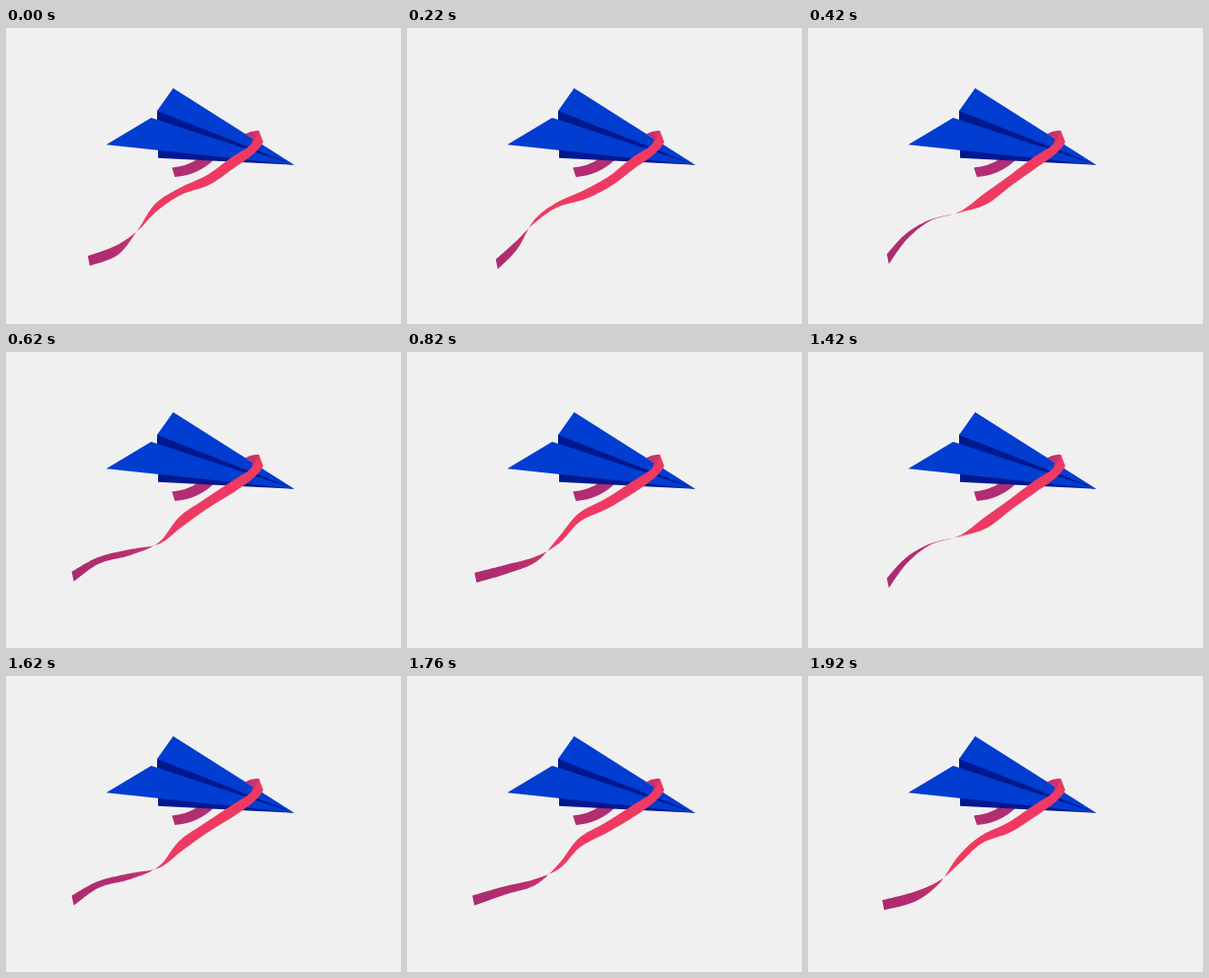
An HTML page that plays this animation: 400 px wide and 300 px high, repeating every 1.96 s.

```html
<!DOCTYPE html>
<html lang="en">
<head>
<meta charset="utf-8">
<title>Paper plane</title>
<style>
  html, body { margin: 0; width: 100%; height: 100%; overflow: hidden; background: #f0f0f0; }
  svg { display: block; width: 100%; height: 100%; }
</style>
</head>
<body>
<svg viewBox="0 0 400 300">
  <defs>
    <linearGradient id="fade">
      <stop offset="0" stop-color="#ac2b70"/>
      <stop offset=".55" stop-color="#b42d70"/>
      <stop offset="1" stop-color="#d0346a"/>
    </linearGradient>
    <linearGradient id="bend">
      <stop offset="0" stop-color="#b62e70"/>
      <stop offset="1" stop-color="#dc3866"/>
    </linearGradient>
  </defs>
  <!-- ribbon behind the plane -->
  <path fill="#b22d72" d="M168,141.5 Q182,140.5 194,133 L211,133 Q195,149 171,151Z"/>
  <!-- plane -->
  <path fill="#00188f" d="M153,84 L165,80 L292,138.7 L154,131.7 L154,122 L153,93Z"/>
  <path fill="#003dd0" d="M153,84 L169.3,61 L292,138.7Z"/>
  <path fill="#003dd0" d="M101.5,118.3 L147,91 L155,93.5 L292,138.7 L155,124Z"/>
  <!-- ribbon in front -->
  <path fill="url(#bend)" d="M242,107.5 Q249,103.5 256,104 L259,113 L248,118 Q251,112 249,111.5Z"/>
  <path id="tail" fill="url(#fade)"/>
  <path id="front" fill="#ee3a62"/>
</svg>
<script>
const LOOP = 1960, CYCLE = 20, DETAIL = 16;

// Fixed start of the loose ribbon: centre x, centre y, height
const ROOT = [[245, 126.5, 10], [229, 137, 11]];

// Points evenly spaced along the ribbon, each swinging about a rest place.
// Swings are [size, step of the peak]; a negative height shows the back side.
const POINTS = [
  { x: 204,   y: 154.3, h: 10,   dx: [1.7, 3.6],  dy: 1,   dh: [0, 0] },
  { x: 177.3, y: 169.6, h: 9,    dx: [2.8, 6],    dy: 4,   dh: [2, 9.5] },
  { x: 153.2, y: 186.5, h: 4,    dx: [1.8, 12],   dy: 7.5, dh: [3.5, 19.5] },
  { x: 128.5, y: 201.8, h: -1.7, dx: [4.7, 19.3], dy: 8,   dh: [4.5, 3.5] },
  { x: 103.7, y: 217.5, h: -7.5, dx: [10, 1.7],   dy: 7.7, dh: [2, 9] },
  { x: 78.5,  y: 233.2, h: -10,  dx: [12.5, 3.6], dy: 6.3, dh: [0, 0] }
];

const swing = (step, [size, peak]) => size * Math.cos(2 * Math.PI * (step - peak) / CYCLE);

// The vertical wave runs down the ribbon, 3.5 steps from point to point
function ribbon(step) {
  return ROOT.concat(POINTS.map((p, i) => [
    p.x + swing(step, p.dx),
    p.y + swing(step, [p.dy, 6 + 3.5 * i]),
    p.h + swing(step, p.dh)
  ]));
}

// Catmull-Rom value between b and c
const spline = (a, b, c, d, u) =>
  b + u / 2 * (c - a + u * (2 * a - 5 * b + 4 * c - d + u * (3 * (b - c) + d - a)));

function smooth(points) {
  const last = points.length - 1, line = [];
  for (let i = 0; i < last; i++) {
    const [a, b, c, d] = [-1, 0, 1, 2].map(k => points[Math.max(0, Math.min(last, i + k))]);
    for (let j = 0; j < DETAIL; j++)
      line.push(b.map((v, n) => spline(a[n], v, c[n], d[n], j / DETAIL)));
  }
  return [...line, points[last]];
}

// One long edge of a strip; the cut leans slightly
const edge = (line, side) => line.map(([x, y, h]) =>
  (x + side * h / 10).toFixed(2) + "," + (y + side * h / 2).toFixed(2));

const strip = line => [...edge(line, 1), ...edge(line, -1).reverse()].join(" L");

const front = document.getElementById("front");
const tail = document.getElementById("tail");

function draw(frame) {
  const line = smooth(ribbon(frame % CYCLE));
  const twist = line.findIndex(p => p[2] <= 0);
  line[twist][2] = 0;
  front.setAttribute("d", "M256,104 L260.5,115.5 Q258,122 " +
    strip(line.slice(0, twist + 1)) + " Q253,115 256,104Z");
  tail.setAttribute("d", "M" + strip(line.slice(twist)) + "Z");
}

// Frames alternate between 40 and 60 ms
function frameAt(t) {
  const k = Math.floor(t / 100), r = t % 100;
  return 2 * k + (r >= 60) - (k > 0 && r < 20);
}

const start = performance.now();
function tick() {
  draw(frameAt((performance.now() - start) % LOOP));
  requestAnimationFrame(tick);
}
tick();
</script>
</body>
</html>
```
